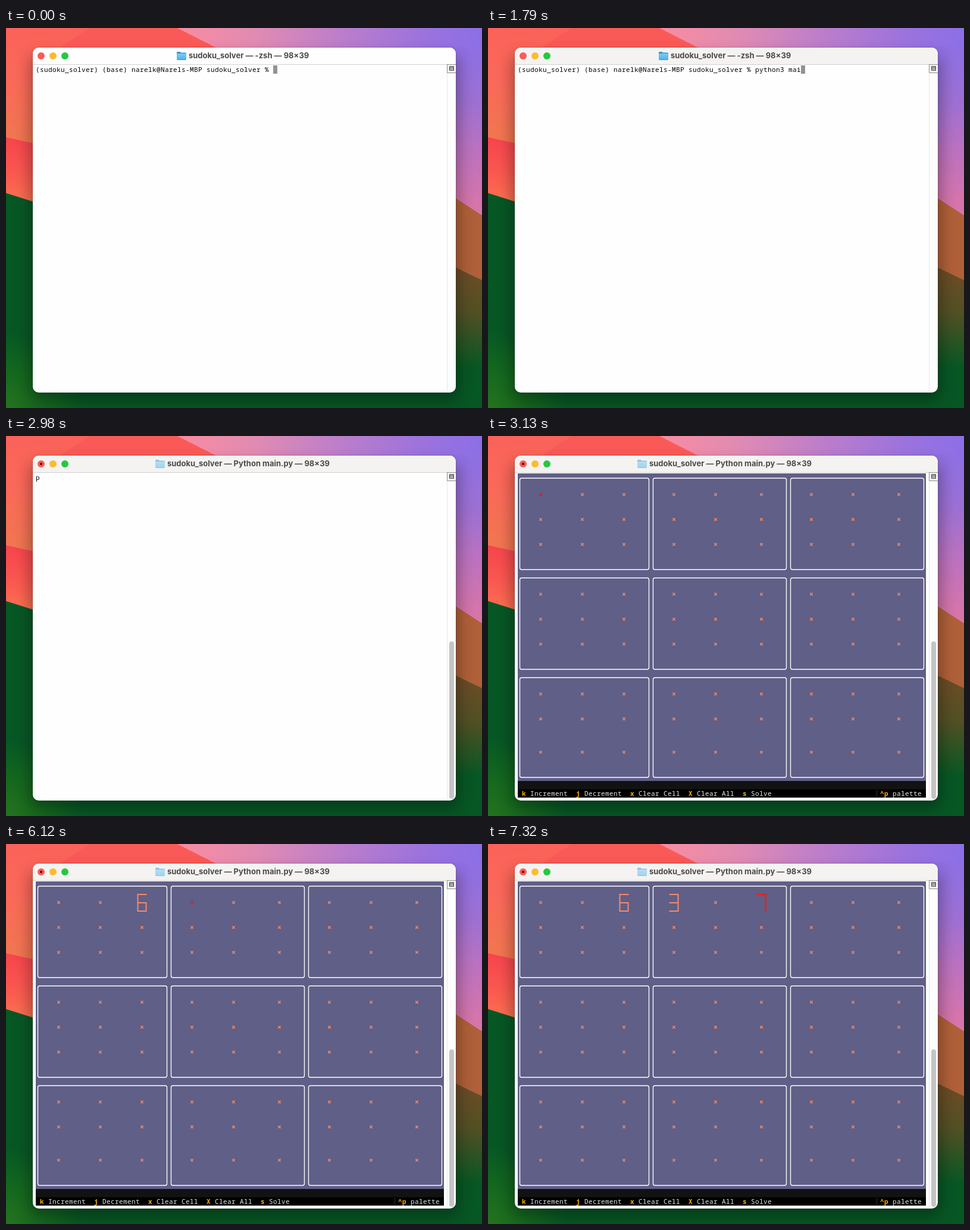
Animation, 800 px wide and 640 px high, one loop 8000 ms. Source, as an HTML page:

```html
<!DOCTYPE html>
<html lang="en">
<head>
<meta charset="utf-8">
<title>Terminal sudoku</title>
<style>
  html, body { margin: 0; width: 100%; height: 100%; overflow: hidden; }
  svg { display: block; width: 800px; height: 640px; }
  text { white-space: pre; }
  .mono { font: 500 11px "Noto Sans Mono", monospace; letter-spacing: .4px; }
  .title { font: 700 13px Inter, sans-serif; fill: #4b4a49; }
  .shadow { filter: blur(13px); }
  .key { fill: #ffaf00; font-weight: 700; }
  .label { fill: #e4e4e4; }
  .panel { fill: none; stroke: #fff; stroke-width: 1.35; }
  .mark { fill: none; stroke: #f58a68; stroke-width: 1.4; }
  .digit { stroke-width: 2; stroke-linecap: square; }
  .selected { stroke: #dc1f22; stroke-width: 1.8; }
  .digit.selected { stroke: #ec2015; stroke-width: 2.6; }
</style>
</head>
<body>
<svg viewBox="0 0 800 640">
  <defs>
    <linearGradient id="coral" x2="0" y2="1">
      <stop stop-color="#fa6259"/><stop offset=".45" stop-color="#fa6959"/><stop offset="1" stop-color="#f0784f"/>
    </linearGradient>
    <linearGradient id="scarlet" x2="0" y2="1">
      <stop stop-color="#f6444d"/><stop offset=".55" stop-color="#fa5850"/><stop offset="1" stop-color="#fb7150"/>
    </linearGradient>
    <linearGradient id="sky" gradientUnits="userSpaceOnUse" x1="290" x2="800">
      <stop stop-color="#f98ca1"/><stop offset=".25" stop-color="#e18bb2"/>
      <stop offset=".55" stop-color="#ba7dcc"/><stop offset=".8" stop-color="#9c73dd"/><stop offset="1" stop-color="#8c6fe6"/>
    </linearGradient>
    <linearGradient id="dusk" gradientUnits="userSpaceOnUse" x1="795" y1="40" x2="770" y2="315">
      <stop stop-color="#8f6fe2"/><stop offset=".3" stop-color="#9c70d3"/>
      <stop offset=".6" stop-color="#bb72bf"/><stop offset="1" stop-color="#dc75a5"/>
    </linearGradient>
    <linearGradient id="olive" gradientUnits="userSpaceOnUse" x1="0" y1="405" x2="0" y2="570">
      <stop stop-color="#6d4c26"/><stop offset=".45" stop-color="#525024"/><stop offset="1" stop-color="#095723"/>
    </linearGradient>
    <radialGradient id="leaf" gradientUnits="userSpaceOnUse" cx="0" cy="640" r="130">
      <stop stop-color="#26731f"/><stop offset=".55" stop-color="#12661f"/><stop offset="1" stop-color="#075725"/>
    </radialGradient>
    <linearGradient id="folder" x2="0" y2="1">
      <stop stop-color="#75cdf8"/><stop offset="1" stop-color="#4fb1ec"/>
    </linearGradient>
  </defs>

  <g id="wallpaper">
    <path fill="#075725" d="M0 0H800V640H0z"/>
    <path fill="url(#leaf)" d="M0 500H140V640H0z"/>
    <path fill="#fa5a57" d="M0 0H400V300H0z"/>
    <path fill="url(#coral)" d="M0 0H140L50 60V200L0 184z"/>
    <path fill="url(#scarlet)" d="M0 184L50 195V294L0 278z"/>
    <path fill="#075725" d="M0 278L60 297V400H0z"/>
    <path fill="url(#sky)" d="M288 0H800V60H406z"/>
    <path fill="url(#dusk)" d="M740 32H800V316L740 277z"/>
    <path fill="#b06039" d="M740 277L800 316V425L740 396z"/>
    <path fill="url(#olive)" d="M740 396L800 425V570H740z"/>
  </g>

  <rect class="shadow" x="40" y="46" width="721" height="581" rx="14" opacity=".32"/>
  <rect x="44.5" y="32.5" width="712" height="582" rx="10.5" fill="none" stroke="#000" stroke-opacity=".12"/>
  <rect x="45" y="33" width="711" height="581" rx="10" fill="#fefefe"/>
  <path id="titlebar" d="M45 61V43a10 10 0 0 1 10-10H746a10 10 0 0 1 10 10V61z"/>
  <path stroke="#d3d2d1" d="M45 61.5H756"/>
  <path stroke="#e7e7e7" d="M741.5 62V614"/>
  <circle cx="59" cy="47" r="6" fill="#fb5c54"/>
  <circle cx="79" cy="47" r="6" fill="#fdbb2d"/>
  <circle cx="99" cy="47" r="6" fill="#27c840"/>
  <circle id="busyDot" cx="59" cy="47" r="2" fill="#4d0808"/>
  <g id="folderIcon">
    <path fill="#3b91cd" d="M0 1.5Q0 0 1.5 0H5.5L7 1.5H14.5Q16 1.5 16 3V6H0z"/>
    <rect y="3" width="16" height="11" rx="1.5" fill="url(#folder)"/>
    <path stroke="#3d98d3" d="M1 13.5H15"/>
  </g>
  <text id="title" class="title" y="51"></text>
  <path fill="#f5f5f5" stroke="#8d8d8d" d="M741.5 61.5H756M741.5 61V75.5H756"/>
  <path fill="#ddd" stroke="#454545" d="M745.5 64.5H752.5V71.5H745.5zM745 66.5H753M746 69H752"/>
  <rect id="thumb" x="745" y="346" width="8" height="265" rx="4" fill="#c4c4c4"/>

  <g id="shell">
    <path id="brackets" fill="none" stroke="#a5a5a5" d="M50 64.5H47.5V76.5H50M736 64.5H738.5V76.5H736"/>
    <rect id="cursor" width="7" height="14" fill="#939393"/>
    <text id="prompt" class="mono" x="50" y="74"></text>
  </g>

  <g id="game">
    <path fill="#5f5f87" d="M50 63H736V581H50z"/>
    <path fill="#121212" d="M50 581H736V595H50z"/>
    <path d="M50 595H736V609H50z"/>
    <path stroke="#303030" d="M653.5 596V608"/>
    <g id="panels"></g>
    <g id="board"></g>
    <g id="footer"></g>
  </g>
</svg>

<script>
const LOOP = 8000, CELL = 7;
const PROMPT = "(sudoku_solver) (base) narelk@Narels-MBP sudoku_solver % ";
const COMMAND = "python3 main.py";
const ENTER = 2830, CLEARED = 2980, READY = 3130;

// [time, characters typed]
const TYPING = [[0, 0], [750, 1], [900, 2], [1050, 4], [1200, 6], [1500, 7], [1640, 9],
  [1790, 11], [1940, 12], [2090, 13], [2240, 14], [2380, 15]];
// [time, selected column]
const SELECTION = [[0, 0], [4480, 1], [4770, 2], [6120, 3], [6870, 4], [7020, 5]];
const DIGITS = [
  { col: 2, time: 5520, path: "M14 0H0V28H14V14H0" },
  { col: 3, time: 6270, path: "M0 0H14V28H0M0 14H14" },
  { col: 5, time: 7320, path: "M0 0H14V28" }
];
const COLUMNS = [88.5, 158.5, 228.5, 312.5, 382.5, 459.5, 543.5, 613.5, 690.5];
const ROWS = [98.5, 140.5, 182.5, 266.5, 308.5, 350.5, 434.5, 476.5, 532.5];
const FOOTER = [["k", "Increment", 57], ["j", "Decrement", 148], ["x", "Clear Cell", 239],
  ["X", "Clear All", 337], ["s", "Solve", 428], ["^p", "palette", 659]];

const $ = id => document.getElementById(id);
const show = (node, visible) => node.setAttribute("visibility", visible ? "inherit" : "hidden");
const valueAt = (steps, t) => steps.findLast(([start]) => t >= start)[1];

function add(parent, tag, attrs, text = "") {
  const node = document.createElementNS("http://www.w3.org/2000/svg", tag);
  for (const name in attrs) node.setAttribute(name, attrs[name]);
  node.textContent = text;
  return parent.appendChild(node);
}

for (const [y, height] of [[71, 154], [239, 154], [407, 168]])
  for (const [x, width] of [[53.5, 217], [277.5, 224], [508.5, 224]])
    add($("panels"), "rect", { class: "panel", x, y, width, height, rx: 3 });

const crosses = ROWS.flatMap(y => COLUMNS.map(x =>
  add($("board"), "path", { class: "mark", d: `M${x - 2.2} ${y - 2.2}l4.4 4.4m0 -4.4l-4.4 4.4` })));

for (const digit of DIGITS)
  digit.node = add($("board"), "path",
    { d: digit.path, transform: `translate(${COLUMNS[digit.col] - 7} 85)` });

for (const [key, label, x] of FOOTER) {
  add($("footer"), "text", { class: "mono key", x, y: 606 }, key);
  add($("footer"), "text", { class: "mono label", x: x + (key.length + 1) * CELL, y: 606 }, label);
}

function drawWindow(t) {
  const running = t >= CLEARED;
  const left = running ? 251 : 287;
  $("titlebar").setAttribute("fill", t < 750 ? "#fefefe" : "#f4f3f1");
  $("title").textContent = `sudoku_solver — ${running ? "Python main.py" : "-zsh"} — 98×39`;
  $("title").setAttribute("x", left + 20);
  $("folderIcon").setAttribute("transform", `translate(${left} 40)`);
  $("folderIcon").setAttribute("opacity", running ? .5 : 1);
  show($("busyDot"), running);
  show($("thumb"), running);
}

function drawShell(t) {
  const typed = valueAt(TYPING, t);
  const entered = t >= ENTER;
  $("prompt").textContent = t < CLEARED ? PROMPT + COMMAND.slice(0, typed) : "p";
  $("cursor").setAttribute("x", entered ? 50 : 50 + (PROMPT.length + typed) * CELL);
  $("cursor").setAttribute("y", entered ? 77 : 63);
  show($("cursor"), t < CLEARED);
  show($("brackets"), entered && t < CLEARED);
  show($("shell"), t < READY);
}

function drawGame(t) {
  const selected = valueAt(SELECTION, t);
  show($("game"), t >= READY);
  crosses.forEach((cross, i) => {
    cross.setAttribute("class", i === selected ? "mark selected" : "mark");
    show(cross, !DIGITS.some(d => d.col === i && t >= d.time));
  });
  for (const { node, col, time } of DIGITS) {
    node.setAttribute("class", col === selected ? "mark digit selected" : "mark digit");
    show(node, t >= time);
  }
}

function frame() {
  const t = performance.now() % LOOP;
  drawWindow(t);
  drawShell(t);
  drawGame(t);
  requestAnimationFrame(frame);
}
frame();
</script>
</body>
</html>
```
